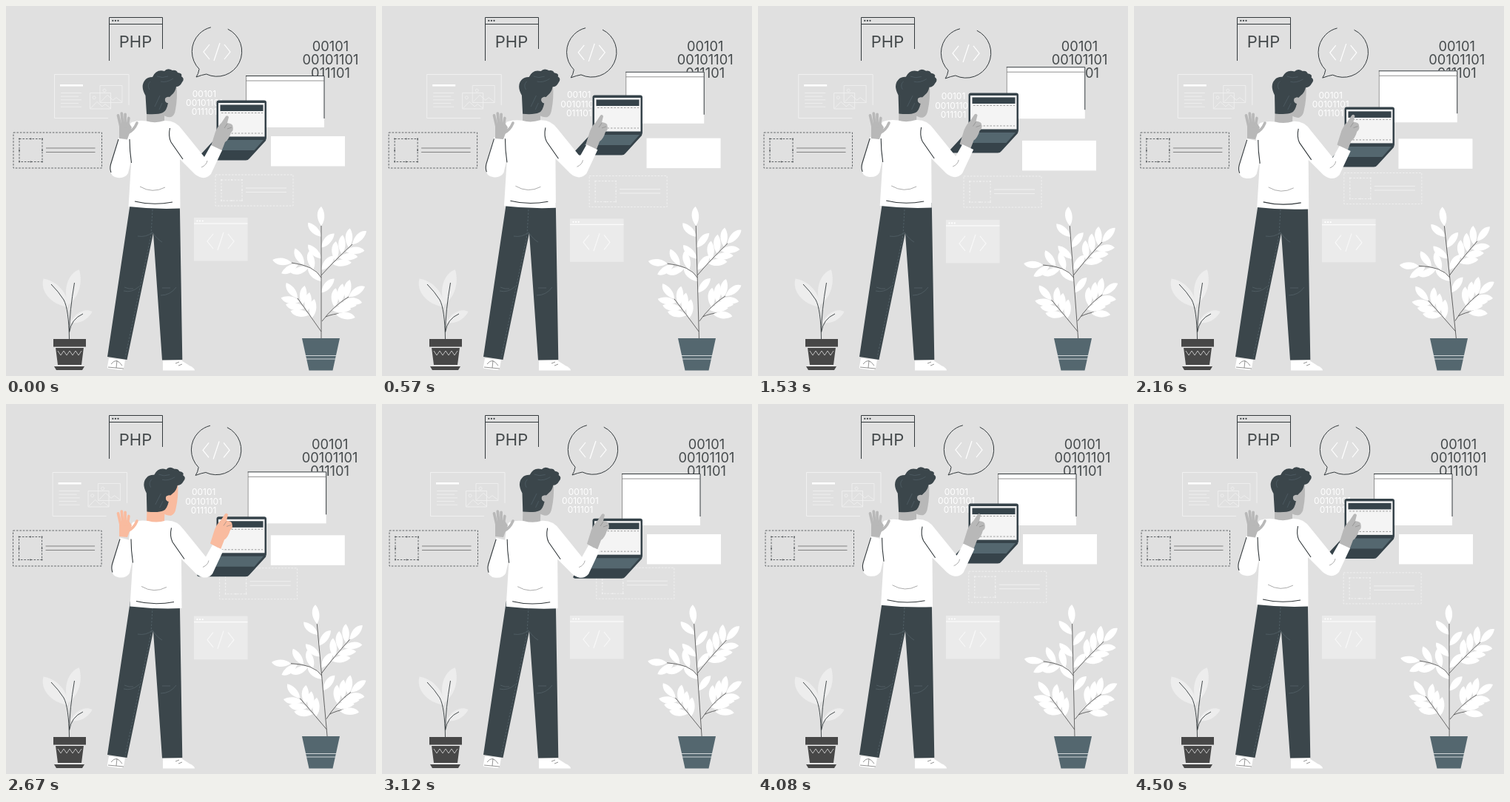
An HTML page with a canvas for the animation above (4.53 s loop, 500 by 500 pixels).

```html
<!DOCTYPE html>
<html lang="en">
<head>
<meta charset="utf-8">
<title>Developer at work</title>
<style>
html, body { margin: 0; width: 100%; height: 100%; overflow: hidden; background: #e0e0e0; }
canvas { display: block; width: 100vmin; height: 100vmin; }
</style>
</head>
<body>
<canvas id="stage" width="500" height="500"></canvas>
<script>
const ctx = document.getElementById('stage').getContext('2d');
const LOOP = 4530, RAD = Math.PI / 180;
const BG = '#e0e0e0', DARK = '#3b464b', SHELL = '#36434a', SLATE = '#54676f', INK = '#33393c';
const GREY = '#454a4c', MUTED = '#777', PALE = '#ededed', FAINT = '#f2f2f2', WHITE = '#fff';
const FONT = 'Inter, Roboto, sans-serif';

// Laptop bob: two harmonics, so that it rises gently and drops faster
function liftAt(t) {
  const a = 2 * Math.PI * t / LOOP;
  return 5.8 - 6.4 * Math.cos(a) - 17.7 * Math.sin(a) + 0.6 * Math.cos(2 * a) + 4.3 * Math.sin(2 * a);
}

// The panels drift out, come back and then rest
function driftAt(t) {
  return 1.07 * Math.max(0, t < 1400 ? t / 1400 : (3000 - t) / 1600);
}

function fill(d, color) {
  ctx.fillStyle = color;
  ctx.fill(new Path2D(d));
}

function stroke(d, color, width = 1, dash = []) {
  ctx.strokeStyle = color;
  ctx.lineWidth = width;
  ctx.setLineDash(dash);
  ctx.stroke(new Path2D(d));
  ctx.setLineDash([]);
}

function rect(x, y, w, h, color) {
  ctx.fillStyle = color;
  ctx.fillRect(x, y, w, h);
}

function dot(x, y, r, color) {
  ctx.fillStyle = color;
  ctx.beginPath();
  ctx.arc(x, y, r, 0, 7);
  ctx.fill();
}

function moved(dx, dy, draw) {
  ctx.save();
  ctx.translate(dx, dy);
  draw();
  ctx.restore();
}

function turned(degrees, x, y, draw) {
  ctx.save();
  ctx.translate(x, y);
  ctx.rotate(degrees * RAD);
  ctx.translate(-x, -y);
  draw();
  ctx.restore();
}

function text(s, x, y, size, color) {
  ctx.font = `400 ${size}px ${FONT}`;
  ctx.textAlign = 'center';
  ctx.fillStyle = color;
  ctx.fillText(s, x, y);
}

function binary(x, y, size, step, color) {
  ['00101', '00101101', '011101'].forEach((s, i) => text(s, x, y + i * step, size, color));
}

function dots(x, y, color) {
  for (let i = 0; i < 3; i++) dot(x + i * 3.6, y, 1.1, color);
}

function codeMark(x, y, color) {
  stroke(`M${x - 10} ${y - 10}l-8 10l8 10M${x + 4} ${y - 12}l-8 24M${x + 10} ${y - 10}l8 10l-8 10`, color, 1.2);
}

function phpWindow() {
  stroke('M139.5 74V15.5H211.5V58M139.5 24.5H211.5', INK);
  dots(144.3, 19.8, INK);
  text('PHP', 175, 56.3, 22, GREY);
}

function bubble() {
  ctx.strokeStyle = INK;
  ctx.lineWidth = 1;
  ctx.beginPath();
  ctx.arc(285, 61.5, 33.7, -64 * RAD, 115 * RAD);
  ctx.quadraticCurveTo(265, 93, 257, 96);
  ctx.quadraticCurveTo(260, 92, 261, 85.5);
  ctx.arc(285, 61.5, 33.7, 135 * RAD, 256 * RAD);
  ctx.stroke();
  codeMark(285, 62, WHITE);
}

function picture(x, y, w, h) {
  stroke(`M${x} ${y}h${w}v${h}h${-w}zm1 ${h - 1}l${w * .3} ${-h * .4}l${w * .25} ${h * .3}l${w * .15} ${-h * .15}l${w * .25} ${h * .25}`, FAINT, 0.8);
  stroke(`M${x + w * .2} ${y + h * .2}a2 2 0 1 0 .1 0`, FAINT, 0.8);
}

function photoPanel() {
  stroke('M138 151.5H65.5V92.5H166V134', FAINT, 0.9);
  rect(73, 106, 31, 2.6, WHITE);
  for (let i = 0; i < 5; i++) stroke(`M74 ${117.5 + i * 4.7}h${i % 2 ? 24 : 28}`, FAINT, 0.8);
  picture(113.5, 117.5, 28, 21.5);
  picture(127, 107.5, 30, 23);
}

function dashedCard(x, y, w, h, size, color, lineColor) {
  const sx = x + 8, sy = y + (h - size) / 2, my = y + h / 2;
  stroke(`M${x} ${y}h${w}v${h}h${-w}zM${sx} ${sy}h${size}v${size}h${-size}z`, color, 0.85, [2.6, 1.8]);
  for (let i = 0; i < 8; i++) {
    const k = i < 4 ? i : i + 1;
    dot(sx + k % 3 * size / 2, sy + Math.floor(k / 3) * size / 2, 0.9, color);
  }
  stroke(`M${sx + size + 5} ${my - 3}H${x + w - 9}M${sx + size + 5} ${my + 2.5}H${x + w - 9}`, lineColor, 0.9);
}

function whiteWindow() {
  rect(324, 94, 106, 70, WHITE);
  stroke('M324.5 163V94.5', MUTED, 0.8);
  stroke('M324 94.5H430V152', INK);
  stroke('M324.5 101H430', MUTED, 0.8);
}

function codePanel() {
  rect(254, 286, 72.5, 58.5, '#ebebeb');
  stroke('M254 294H326.5', WHITE);
  dots(258.5, 290.5, WHITE);
  codeMark(290, 318, '#f8f8f8');
}

function laptop() {
  fill('M284 178H352L351 182L329 206Q327 208.500 324 208.500H261Q257 208 259 205Z', SHELL);
  fill('M289 181H348L335.5 195H273Z', SLATE);
  ctx.fillStyle = SHELL;
  ctx.beginPath();
  ctx.roundRect(284.5, 127.5, 67.5, 52.5, 3);
  ctx.fill();
  rect(287, 131, 62.5, 45.5, '#f4f4f4');
  rect(289.5, 133.5, 58, 8.5, SHELL);
  stroke('M291 144.5H347M291 172H347', '#888', 0.8, [2.5, 2]);
}

function legs() {
  fill('M139 476L161 478L159 490Q158 492 154 492L139 490Q136 490 137 487Z', WHITE);
  fill('M212 479H237L248 486Q255 489 255 492.5H212Z', WHITE);
  stroke('M138 488L159 490M142 484Q149 474 157 486M150 479L149 489M229 483l5-2M233 486l5-2', '#666', 0.7);
  fill('M168 266H234.800L238.300 478L211 478.500L199 307L163.500 478L137 474Z', DARK);
  stroke('M198 275L196 310L161 475', '#5b6b72', 0.7, [2.5, 2]);
  stroke('M178 311Q189 313 198 306Q205 316 211 319M159 385Q170 388 180 379M160 380Q166 383 172 382M209 391Q222 391 230 380M211 381H222', '#536168', 0.8);
}

function leftHand(skin) {
  fill('M153 179L153 162L157 156L166 158L170 164L164 180Z', skin);
  ctx.lineCap = 'round';
  for (let i = 0; i < 4; i++) {
    stroke(`M${155 + i * 3} 163L${151.5 + i * 4.8} ${145 + (i - 1.2) ** 2 * 2}`, skin, 3.7);
  }
  stroke('M164 172Q173 168 177 158', skin, 3.6);
  ctx.lineCap = 'butt';
}

function rightHand(skin) {
  fill('M277 189L283 170Q287 161 291 158L297 149Q299.500 147 301 150L299 158Q307 159 306.500 163Q308 168 304 171Q301 181 296 184L291 197Z', skin);
  stroke('M299 159L295 165M305 164L299 166', MUTED, 0.5);
}

function head(skin) {
  fill('M190 143L214 143V160Q202 165 190 158Z', skin);
  fill('M216 108H230.5Q232 124 229 140Q228 148 223 150Q217 151 210 146Z', skin);
  fill('M190 146L188.5 121Q181 108 188 100Q191 96 198 96Q203 85 214 88Q218 83 225 87Q230 86 232 90Q239 91 237 95Q242 98 238 103Q235 109 230 109Q229 116 224 120L220 124Q214 122 215 128Q216 131 219 131Q217 142 212 144Q206 147 190 146Z', DARK);
  dot(219.5, 127, 4.3, skin);
  stroke('M204 95Q211 98 219 95M209 102Q217 104 226 98M194 113Q190 107 195 102M201 136L208 121M207 140L211 131', '#526169', 0.7);
}

function torso() {
  fill('M170 157Q179 154 190 155.5Q202 159 214 155Q229 154 238 167L268 204L277 188L292 195L277 227Q272 233 265 232Q258 231 251 223L235 207L235.500 273.500Q201 275 165.500 271L169.500 207L165 226Q161 233 151 232Q141 231 140.500 220Q142 211 152 178L164 181L166 166Q167 159 170 157Z', WHITE);
  stroke('M152 180L141.5 214Q140 220 142 225M167 180Q167 195 169.5 212M221.5 165Q219 176 223 184L239 207M174 264Q198 270 225 265', INK, 1.1);
  stroke('M181 244Q198 254 215 245M264 218Q271 215 272 209', '#888', 0.7);
}

function leaf(x, y, angle, length, width, color) {
  ctx.save();
  ctx.translate(x, y);
  ctx.rotate(angle);
  const l = length, w = width;
  fill(`M0 0C${l * .35} ${-w} ${l * .8} ${-w} ${l} 0C${l * .8} ${w * .6} ${l * .35} ${w} 0 0Z`, color);
  ctx.restore();
}

function smallPlant() {
  leaf(84, 407, -131 * RAD, 51, 15, PALE);
  leaf(84, 404, -73 * RAD, 50, 13, PALE);
  leaf(87, 428, -27 * RAD, 33, 9, PALE);
  stroke('M85.5 450Q85 410 78 397Q71 386 61 376M85.5 440Q86 412 92.5 374M85.5 441Q88 423 104 416', INK, 0.9);
  rect(64, 450, 44, 10.5, '#474747');
  fill('M67 461.5H105L102 485H70ZM65 487H106L103 492H68Z', '#474747');
  stroke('M66 461.5H106M66 486H105', '#eee');
  stroke('M70 466' + 'l4 6l4-6'.repeat(4), '#ddd', 0.8);
}

// A curved twig with leaves fanning alternately from its outer part and one at its tip
function twig(x0, y0, cx, cy, x1, y1, pairs) {
  const at = (a, b, c, u) => (1 - u) ** 2 * a + 2 * u * (1 - u) * b + u * u * c;
  for (let i = 0; i <= 2 * pairs; i++) {
    const u = 0.4 + 0.6 * i / (2 * pairs);
    const x = at(x0, cx, x1, u), y = at(y0, cy, y1, u);
    const heading = Math.atan2(y - at(y0, cy, y1, u - 0.1), x - at(x0, cx, x1, u - 0.1));
    const side = i === 2 * pairs ? 0 : i % 2 ? -1 : 1;
    leaf(x, y, heading + side * 0.75, 26, 7, WHITE);
  }
  stroke(`M${x0} ${y0}Q${cx} ${cy} ${x1} ${y1}`, '#4a4a4a', 0.8);
}

function foliage() {
  twig(426, 451, 426, 370, 426, 297, 3);
  twig(426, 367, 417, 351, 386, 347, 2);
  twig(426, 364, 443, 345, 468, 322, 3);
  twig(426, 440, 410, 417, 394, 395, 3);
  twig(427, 426, 443, 405, 463, 393, 3);
  stroke('M432 420Q441 416 456 415', '#4a4a4a', 0.8);
  leaf(446, 417, 0.15, 26, 7, WHITE);
}

function largePot() {
  fill('M400 449H451L441.5 492.5H409.500Z', SLATE);
  stroke('M405 472.5H446M406 477H445', '#dfe4e6', 0.9);
}

function render(t) {
  const lift = liftAt(t), drift = driftAt(t);
  const sway = 1 - Math.abs(t / LOOP * 2 - 1);
  const skin = t >= 2430 && t < 3000 ? '#f9bb9f' : '#b8b8b8';

  rect(0, 0, 500, 500, BG);
  phpWindow();
  moved(-4 * drift, 2 * drift, bubble);
  moved(-11 * drift, 0, photoPanel);
  moved(-2 * drift, 0, () => dashedCard(10, 171, 119.5, 48, 31, '#4a4f52', MUTED));
  moved(-4 * drift, 0, () => binary(438.5, 61, 18.3, 18, GREY));
  moved(12 * drift, -12 * drift, whiteWindow);
  moved(-drift, 6 * drift, () => rect(358, 176, 100, 40.5, WHITE));
  moved(-4 * drift, 4 * drift, () => binary(268, 122.5, 12, 12.3, WHITE));
  moved(lift * 0.25 - 2.5 * drift, -lift * 0.25 - drift * 0.5, () => dashedCard(283, 228, 105, 42, 28, FAINT, FAINT));
  moved(0, 3 * drift, codePanel);
  smallPlant();
  turned(-6.3 * sway, 426, 360, foliage);
  largePot();
  moved(0, lift, laptop);
  legs();
  turned(2.5 * sway, 204, 158, () => head(skin));
  moved(-4.5 * drift, -2.5 * drift, () => rightHand(skin));
  moved(lift * 0.08, lift * 0.1, torso);
  leftHand(skin);
}

function tick(now) {
  render(Math.floor(now % LOOP / 30) * 30);
  requestAnimationFrame(tick);
}
render(0);
requestAnimationFrame(tick);
</script>
</body>
</html>
```
